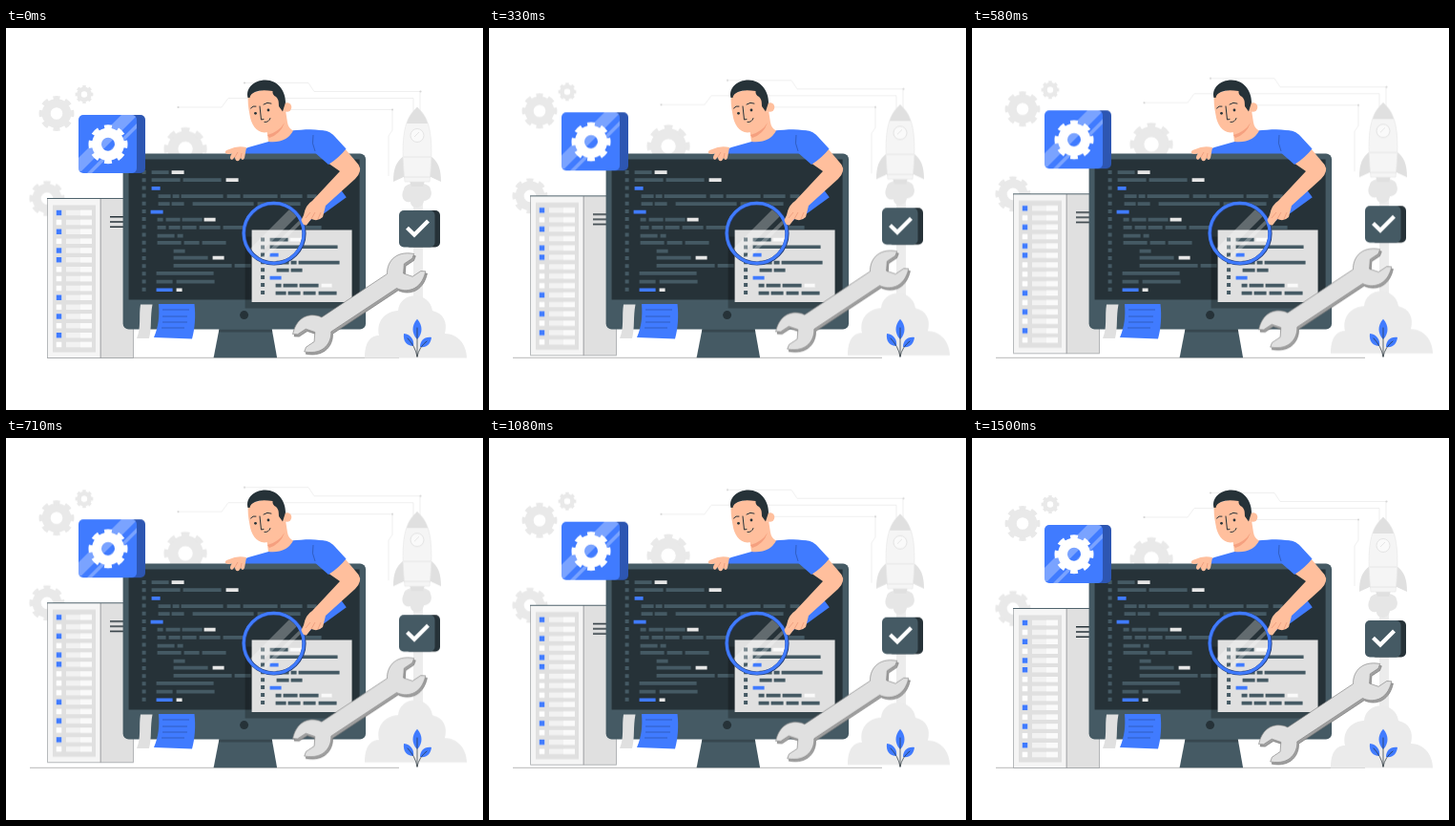
These frames come from a looping animation (500x400 px, 1540 ms). An HTML page without scripts:

```html
<!DOCTYPE html>
<html lang="en">
<head>
<meta charset="utf-8">
<title>Software maintenance</title>
<style>
  html, body { margin: 0; width: 100%; height: 100%; overflow: hidden; background: #fff; }
  svg { display: block; width: 500px; height: 400px; }
  .float { animation: float 1540ms linear infinite; }
  .ground-end { animation: ground-end 1540ms step-end infinite; }
  @keyframes float {
    0%, 97.4%, 100% { transform: translateY(0); }
    48% { transform: translateY(-6px); }
  }
  @keyframes ground-end {
    0% { opacity: 0; }
    2.6%, 100% { opacity: 1; }
  }
  .blue { fill: #407bff; }
  .slate { fill: #455a64; }
  .dark { fill: #263238; }
  .skin { fill: #ffbf9d; }
  .line { fill: none; stroke: #263238; stroke-linecap: round; stroke-linejoin: round; }
  .crease { fill: none; stroke: #eb9a7b; stroke-width: .8; }
  .code { fill: none; stroke-width: 3.6; }
  .gray { stroke: #455a64; }
  .white { stroke: #e6e6e6; }
  .accent { stroke: #407bff; }
</style>
</head>
<body>
<svg viewBox="0 0 500 400" xmlns="http://www.w3.org/2000/svg">
  <defs>
    <g id="gear" fill="none" stroke="currentColor">
      <circle r="12" stroke-width="10"/>
      <circle r="18" stroke-width="5" pathLength="16" stroke-dasharray="1.1 .9" stroke-dashoffset=".55"/>
    </g>
    <path id="wrench" d="M-40-9H40C45-18 59-26 74-11L70-8H60L54 0 60 8H70L74 11C59 26 45 18 40 9H-40C-45 18-59 26-74 11L-70 8H-60L-54 0-60-8H-70L-74-11C-59-26-45-18-40-9Z"/>
    <clipPath id="panel"><rect x="76" y="91" width="61" height="61" rx="5"/></clipPath>
    <clipPath id="lens"><circle cx="281" cy="215" r="31"/></clipPath>
  </defs>

  <!-- Ground -->
  <path d="M43 345.300H412" stroke="#a6a6a6" stroke-width=".8"/>
  <path class="ground-end" d="M25 345.300H43" stroke="#a6a6a6" stroke-width=".8"/>

  <!-- Backdrop -->
  <g class="float">
    <g fill="none" stroke="#ebebeb" stroke-width=".8">
      <path d="M180 83H226L233 73.500H427V92"/>
      <path d="M250 57.500H317L323 66.500H434V90"/>
      <path d="M298 85.500H405V107L401 113V155"/>
    </g>
    <g fill="#d6d6d6">
      <circle cx="180.500" cy="83" r="1.100"/><circle cx="250" cy="57.500" r="1.100"/>
      <circle cx="434.500" cy="66.500" r="1.100"/><circle cx="405" cy="85.500" r="1.100"/>
    </g>
    <g color="#e9e9e9">
      <use href="#gear" transform="translate(53 89.500) scale(.9)"/>
      <use href="#gear" transform="translate(82 69.500) scale(.46)"/>
      <use href="#gear" transform="translate(188 126.500) scale(1.100)"/>
      <use href="#gear" transform="translate(43 178.500) scale(.9)"/>
    </g>
  </g>

  <!-- Rocket and smoke -->
  <g class="float">
    <path d="M427 180H437V294H427Z" fill="#ececec"/>
    <path d="M376 345.500C376 332 380 322 391 322 388 308 396 297 411 296 413 275 444 275 447 296 459 299 463 308 460 320 473 320 483 331 483 345.500Z" fill="#ebebeb"/>
    <path d="M417 169C417 160 445 160 445 169 448 176 443 181 438 181 437 190 424 190 424 182 417 184 413 176 417 169Z" fill="#e6e6e6"/>
    <path d="M417 134C409 140 406 147 406 161L419 155ZM445 134C453 140 456 147 456 161L443 155Z" fill="#e0e0e0"/>
    <path d="M423 160H439L437 166H425Z" fill="#e0e0e0"/>
    <path d="M431 83C444 94 449 112 444 161H418C413 112 418 94 431 83Z" fill="#f5f5f5" stroke="#e8e8e8" stroke-width=".7"/>
    <path d="M431 83C436 88 440 93 442 100H420C422 93 426 88 431 83Z" fill="#e0e0e0"/>
    <circle cx="431" cy="112.500" r="7" fill="#fafafa" stroke="#e4e4e4"/>
    <path d="M428 114L433 109" stroke="#e6e6e6"/>
    <path d="M417 135H445M417 156H445" stroke="#e2e2e2" stroke-width=".8"/>
  </g>

  <!-- Server -->
  <g class="float">
    <path d="M99 178.500H133.500V345.500H99Z" fill="#e0e0e0" stroke="#8a8f92" stroke-width=".6"/>
    <path d="M43.500 178.500H99V345.500H43.500Z" fill="#f5f5f5" stroke="#8a8f92" stroke-width=".6"/>
    <path d="M43 178.500H134" stroke="#455a64" stroke-width=".9"/>
    <path d="M49 185.500H94V339.500H49Z" fill="#e0e0e0"/>
    <g transform="translate(0 -.7)" fill="none">
      <g stroke-dasharray="5.500 4.360">
        <path d="M76.500 191.500V335" stroke="#f2f2f2" stroke-width="27"/>
        <path d="M84 191.500V335" stroke="#fafafa" stroke-width="12"/>
        <path d="M55.500 191.500V335" stroke="#fff" stroke-width="5.500"/>
      </g>
      <path d="M55.500 191.500v5.500m0 14.200v5.500m0 14.200v5.500m0 4.400v5.500m0 33.900v5.500m0 14.200v5.500m0 14.200v5.500" stroke="#407bff" stroke-width="5.500"/>
    </g>
    <path d="M109 197.700H125M109 203H125M109 208.300H125" stroke="#263238" stroke-width="1.500"/>
  </g>

  <!-- Shirt, neck and head -->
  <path class="blue" d="M247 134Q249 126 254 125L277 118.500 299 107.500C313 106 328 105 337 109L356 134Z"/>
  <path class="skin" d="M273 104L293 86 295 99Q296 105 301 107.500 294 121 275 119Z"/>
  <path d="M274 112Q286 109 292 99 288 111 276 115Z" fill="#f5a07f"/>
  <circle class="skin" cx="294.500" cy="83" r="4.800"/>
  <path class="skin" d="M254 69L280 62 292 78 291 90C289 101 280 109 271 109.500 262 109 257 101 255.500 91 254 83 253 76 254 69Z"/>
  <path class="dark" d="M253.500 73C251 63 260 54.600 272 54.600 285 54.600 293 66 293 78L290 87.500 286 82Q286 74 283 72 279 70 279.500 66 267 64 261 67 256 69 255.500 73Z"/>
  <path class="line" stroke-width="1" d="M256.500 84Q259 81 262 82M270 80Q274 77 278 79M266 82L267.500 96 270 95.500M271 98.500Q275.500 99 277 94.500"/>
  <circle class="dark" cx="261.500" cy="89.300" r="1.400"/><circle class="dark" cx="275" cy="86" r="1.400"/>

  <g transform="translate(-.4 -.4)">
    <!-- Monitor -->
    <path class="slate" d="M224 315H279L284.500 345.700H218Z"/>
    <path d="M224 316H279L279.500 319H223.500Z" fill="#37474f"/>
    <rect class="slate" x="123" y="132" width="254.500" height="184" rx="6"/>
    <path class="dark" d="M129 138H371V285H129Z"/>
    <circle class="dark" cx="250" cy="301" r="4.500"/>

    <!-- Code -->
    <path class="gray" d="M145 149.500V277" fill="none" stroke-width="4" stroke-dasharray="4 4.170"/>
    <path class="code gray" d="M153 151.500h18M153 159.500h30m3 0h40M160 176.500h13m2 0h7m2 0h44m4 0h14m3 0h36m3 0h23m5 0h10M160 184.500h12m2 0h13m9 0h64m4 0h45M159 201h6m3 0h15m2 0h21M159 209.300h9m3 0h12m2 0h15m3 0h22m3 0h22m63 0h18M159 218h18m3 0h6M159 225.300h25m3 0h16m3 0h25M176 234h12M176 241h36M176 249.300h61m3 0h17M158 257.300h60M158 266h17m4 0h40"/>
    <path class="code white" d="M174 151.500h13M231 159.500h13M208 201h12M217 241h12M179 274.700h6"/>
    <path class="code accent" d="M153 168.300h9M152 193h13M158 274.700h17"/>

    <!-- Window -->
    <path d="M251 219H357V294H251Z" fill="#000" opacity=".24"/>
    <path d="M258 212H363V287.500H258Z" fill="#e0e0e0"/>
    <path class="gray" d="M269.500 220V280" fill="none" stroke-width="4" stroke-dasharray="4 3.900"/>
    <path class="code gray" d="M277 222h19M277 229.700h71M284 246h13m2 0h6m2 0h43M284 254h13m2 0h12M283 270h6m2 0h15m2 0h20M283 278h11m2 0h13m3 0h13m3 0h19"/>
    <path class="code" stroke="#fafafa" d="M298 222h12M331 270h11"/>
    <path class="code accent" d="M277 238h9M277 262h12"/>
  </g>

  <!-- Magnifier -->
  <path clip-path="url(#lens)" d="M250 237L300 187 308 194 261 241ZM264 244L312 197 314 200 267 247Z" fill="#fff" opacity=".28"/>
  <circle cx="281" cy="215" r="31.500" fill="none" stroke="#263f78" stroke-width="4.200"/>
  <circle cx="280.600" cy="214.800" r="31.500" fill="none" stroke="#407bff" stroke-width="3.200"/>
  <path d="M311 204L319 199" stroke="#407bff" stroke-width="4"/>
  <path d="M325 194.500L354 173.500" stroke="#407bff" stroke-width="9.500"/>

  <!-- Arm and hand -->
  <path class="skin" d="M337 141L350 150 321 181Q314 185 312 196L309.500 201Q311 207 315 206.500L320 200Q327 203 332 198L335 186 366 158Q374 150 369.500 143L355 126Z"/>
  <path class="crease" d="M320 200L324 193M327 200L330 193M314 199L319 193"/>
  <path class="blue" d="M322 110C332 104 341 109 345 114L356.500 126.500Q349 136 338 143L322 129Z"/>
  <path d="M322 112Q320 121 324 129" fill="none" stroke="#2d56b2" stroke-width=".8"/>
  <path class="skin" d="M252 125Q242 123 234 127 229 128 230 131 233 133 237 131 233 137 237 138L240 135Q240 140 244 139L246 136Q248 140 250 136Z"/>
  <path class="crease" d="M240 135L243 130M246 136L247 131"/>

  <!-- Notes -->
  <path d="M141 289.500H153.500C151 302 153 314 150 325H137C142 314 139 301 141 289.500Z" fill="#e0e0e0"/>
  <path class="blue" d="M160 289H197.500C199 302 198 315 195 325.500L155 324C160 313 161 301 160 289Z"/>
  <path d="M164 295H192M164 302H190M164 308H190M163 314H187" stroke="#2d56b2" stroke-width=".8"/>

  <!-- Settings tile -->
  <g class="float">
    <rect x="84" y="91" width="62" height="61" rx="5" fill="#2d56b2"/>
    <rect class="blue" x="76" y="91" width="61" height="61" rx="5"/>
    <use href="#gear" x="107" y="121.700" color="#fff"/>
    <path clip-path="url(#panel)" d="M62 150L122 90H139L79 150ZM82 155L147 90H152L87 155Z" fill="#fff" opacity=".3"/>
  </g>

  <!-- Wrench -->
  <g class="float" stroke-width=".6">
    <use href="#wrench" transform="translate(371.800 290) rotate(-33.500) scale(1.030 1)" fill="#a0a0a0" stroke="#777"/>
    <use href="#wrench" transform="translate(370.200 287.700) rotate(-33.500) scale(1.030 1)" fill="#e0e0e0" stroke="#858585"/>
  </g>

  <!-- Check tile -->
  <g class="float">
    <rect class="dark" x="418" y="191" width="37" height="38.500" rx="5"/>
    <rect class="slate" x="412" y="191" width="37.500" height="38.500" rx="5"/>
    <path d="M420.500 209.300L428 216.500 442.500 202" fill="none" stroke="#fff" stroke-width="4.200"/>
  </g>

  <!-- Plant -->
  <g class="blue">
    <path d="M431 304.700C437 311 437 320 431 326 425 320 425 311 431 304.700Z"/>
    <path d="M417 320C425 321 428 327 427 333 420 333 416 328 417 320Z"/>
    <path d="M446 324C438 323 434 328 434 334 441 335 445 331 446 324Z"/>
  </g>
  <path class="line" stroke-width=".7" d="M431 314V344M421 325Q429 333 431 344M441 328Q433 334 431 344"/>
</svg>
</body>
</html>
```
